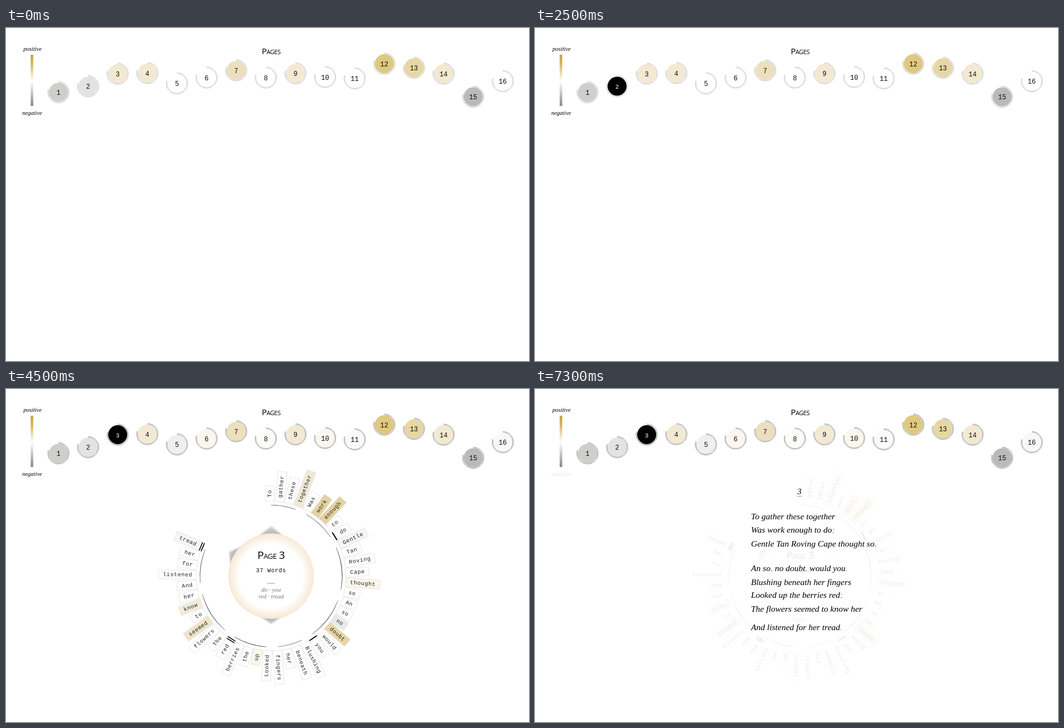
An HTML page that plays this animation: 937x598 px, repeating every 8.3 s.

```html
<!DOCTYPE html>
<html lang="en">
<head>
<meta charset="utf-8">
<style>
html, body { margin: 0; width: 100%; height: 100%; overflow: hidden; background: #fff; }
svg { display: block; }
text { text-anchor: middle; }
.mono { font-family: "Liberation Mono", monospace; }
.word { font-size: 10px; letter-spacing: .6px; fill: #222; }
.title { font-family: "Open Sans", "Noto Sans", sans-serif; font-stretch: 75%; font-variant: small-caps; letter-spacing: -.5px; }
.script { font-family: "Liberation Serif", serif; font-style: italic; }
.verse { font-size: 15.5px; text-anchor: start; }
.star { filter: blur(1.5px); }
</style>
</head>
<body>
<svg id="stage" width="937" height="598" viewBox="0 0 937 598"></svg>
<script>
const LOOP = 8300, STEP = 7.35, INNER = 134, RING = 127.5;

const heights = [115.5, 104.5, 82, 81, 99.5, 89, 76, 89, 81.5, 88, 90.5, 64, 71.5, 82, 123.5, 95.5];
const moods = '#cececd #e3e3e3 #f3e9d3 #f3e9d3 #efefef #faf7ef #ecdfbd #fbfbf8 #f3e9d3 #faf7ee #fafaf8 #dfc97f #e6d7a3 #f3e9d1 #bababa #f8f8f8'.split(' ');
const pale = [5, 6, 8, 10, 11, 16];   // pages whose tint appears late

// Words carry an optional tint; slashes separate verse lines.
const pages = [
  { x: 476, y: 332, title: '1', count: 41, rim: '#dadada', back: 155, keys: ['old · wood', 'supplied · died'],
    spikes: [70, 104, 90, 88, 89, 89],
    text: 'There was a lonely#9e9e9e cabin/Within a dark#ababab old#f3ecda wood/And in it with her mother/There dwelt Tan Roving Cape/The tall#f4f4f4 old trees above/them Their winter fire#e2e2e2 supplied#fbf6e9/When Autumns flaming sunsets From/their red leaves had#f2f2f2 died#a6a6a6' },
  { x: 476, y: 334, title: 'Page 2', count: 41, rim: '#e6e6e6', back: 145, keys: ['sun · one', 'deep · still'],
    spikes: [86, 70, 88, 84, 70, 86],
    text: 'Whenever morn was waking/She went to find the sun#f3ecda/With blossoms#faf6ea in her basket/And songs for every one/The meadow paths were golden#efe3c8/The hedges green and deep#e2e2e2/And all the birds did sing/To buds that lay still#f2f2f2' },
  { x: 475, y: 336, title: 'Page 3', count: 37, rim: '#f5ead3', back: 138, keys: ['do · you', 'red · tread'],
    spikes: [90, 70, 70, 86, 70, 87],
    text: 'To gather these together#f1e9d6/Was work#e4d3a0 enough#e4d3a0 to do/Gentle#f5f5f5 Tan Roving Cape thought#faf6ea so/An so no#e9e9e9 doubt#e8d7a6 would you/Blushing beneath her fingers/Looked up#faf6ea the berries red/The flowers seemed#efe3c8 to know#f4ecdb her/And listened for her tread#f6f6f6' }
];

const verse = ['To gather these together', 'Was work enough to do;', 'Gentle Tan Roving Cape thought so,',
  'An so, no doubt, would you.', 'Blushing beneath her fingers', 'Looked up the berries red;',
  'The flowers seemed to know her', 'And listened for her tread.'];
const baselines = [91, 115, 140, 184, 209, 232, 257, 290];

// Point at a clockwise angle from twelve o'clock
const polar = (r, deg) => {
  const a = deg * Math.PI / 180;
  return `${(r * Math.sin(a)).toFixed(2)} ${(-r * Math.cos(a)).toFixed(2)}`;
};
const arc = (r, from, to) =>
  `M${polar(r, from)}A${r} ${r} 0 ${to - from > 180 ? 1 : 0} 1 ${polar(r, to)}`;
const label = (cls, x, y, str, attrs = '') => `<text class="${cls}" x="${x}" y="${y}" ${attrs}>${str}</text>`;

function dot(y, i) {
  const n = i + 1;
  const ring = arc(19.2, 0, 287) + arc(17.8, 0, 285);
  return `<g transform="translate(${94 + i * 53.07} ${y})">
    <circle r="17" fill="${moods[i]}" ${pale.includes(n) ? 'class="late"' : ''}/>
    <path class="ring" d="${ring}" fill="none" stroke-width=".45"/>
    <circle class="active" r="17"/>
    ${label('mono num', 0, 4.5, n)}</g>`;
}

function wordBox(word, index, bars) {
  const [str, tint = '#fff'] = word.split(/(?=#)/);
  const angle = -1 + STEP * index;
  const len = str.length * 6.6 + 15, r = INNER + (bars ? 4 : 0), mid = r + len / 2;
  let marks = '';
  for (let b = 0; b < bars; b++) {
    const x = bars > 1 ? 133 + b * 3.6 : 134.5;
    marks += `<path d="M${x} -8V8" stroke="#000" stroke-width="${bars > 1 ? 1.6 : 2}"/>`;
  }
  return `<g transform="rotate(${angle - 90})">
    <rect x="${r}" y="-8.2" width="${len}" height="16.4" fill="${tint}" stroke="#ddd" stroke-width=".7"/>${marks}
    <g transform="translate(${mid}) rotate(${angle > 180 ? 180 : 0})">${label('mono word', .3, 3, str)}</g></g>`;
}

function wheel(page, p) {
  let index = 0, words = '', arcs = '';
  page.text.split('/').forEach((line, l) => {
    const list = line.split(' '), first = index;
    list.forEach((word, w) => {
      const bars = w === list.length - 1 && l % 2 ? (l > 4 ? 2 : 1) : 0;
      words += wordBox(word, index++, bars);
    });
    const from = STEP * first, to = STEP * (index - 1) - 2;
    arcs += `${arc(RING, from, to)}A${page.back} ${page.back} 0 0 0 ${polar(RING, from)}Z`;
  });
  const star = page.spikes.map((r, i) => `${polar(r, i * 60)} ${polar(70, i * 60 + 30)}`).join(' ');
  return `<g class="wheel" transform="translate(${page.x} ${page.y})">
    <radialGradient id="rim${p}"><stop offset=".75" stop-color="#fff"/><stop offset="1" stop-color="${page.rim}"/></radialGradient>
    <polygon class="star" points="${star}" fill="url(#spike)"/>
    <circle r="76.5" fill="url(#rim${p})" stroke="${page.rim}" stroke-width=".4"/>
    <path d="${arcs}" stroke="#000" stroke-width=".25"/>${words}
    ${label('title', 0, -31, page.title, `font-size="${page.title.length > 1 ? 19 : 26}" font-weight="${page.title.length > 1 ? 400 : 300}"`)}
    ${label('mono', 0, -7, page.count + ' Words', 'font-size="10" letter-spacing=".75"')}
    <path d="M-7 13H7" stroke="#999"/>
    ${page.keys.map((k, i) => label('script', 0, 27.5 + i * 12.5, k, 'font-size="11" fill="#777"')).join('')}</g>`;
}

const stage = document.getElementById('stage');
stage.innerHTML = `<defs>
  <linearGradient id="scale" x2="0" y2="1"><stop stop-color="#c6a23a"/><stop offset=".18" stop-color="#d4b65e"/>
    <stop offset=".52" stop-color="#fff"/><stop offset="1" stop-color="#858585"/></linearGradient>
  <radialGradient id="spike" gradientUnits="userSpaceOnUse" cx="0" cy="0" r="102">
    <stop offset=".74" stop-color="#b4b4b4"/><stop offset="1" stop-color="#f4f4f4"/></radialGradient></defs>
  ${label('title', 475, 46.5, 'Pages', 'font-size="15"')}
  ${label('script', 47.5, 41, 'positive', 'font-size="10.5"')}
  ${label('script', 47, 156, 'negative', 'font-size="10.5"')}
  <rect x="44.2" y="48" width="4.6" height="92" fill="url(#scale)"/>
  ${heights.map(dot).join('')}
  ${pages.map(wheel).join('')}
  <g id="panel"><rect width="937" height="598" fill="#fff" opacity=".9"/>
    <rect x="463" y="26" width="20" height="32" fill="#fff"/>
    ${label('script', 473.5, 46, 3, 'font-size="15.5"')}<path d="M469 49.5H478" stroke="#999"/>
    ${verse.map((v, i) => label('script verse', 387, baselines[i], v.replace(/[,.;]/g, '<tspan fill="#999">$&</tspan>'))).join('')}</g>`;

const all = sel => [...stage.querySelectorAll(sel)];
const show = (el, on) => el.setAttribute('display', on ? 'inline' : 'none');
const actives = all('.active'), nums = all('.num'), rings = all('.ring'), late = all('.late'), wheels = all('.wheel');
const panel = document.getElementById('panel');
const stops = [476, 402, 308, 210, 143];

function draw(t) {
  const active = t < 1000 ? -1 : t < 2500 ? 0 : t < 4000 ? 1 : 2;
  const open = t >= 4500 ? 2 : t >= 3000 && t < 4000 ? 1 : t >= 1500 && t < 2500 ? 0 : -1;
  const settled = t >= 4500;
  actives.forEach((el, i) => show(el, i === active));
  nums.forEach((el, i) => {
    el.setAttribute('fill', i === active ? '#fff' : '#111');
    el.setAttribute('font-size', i === active ? 10.5 : 12);
  });
  rings.forEach(el => el.setAttribute('stroke', settled ? '#444' : '#999'));
  late.forEach(el => show(el, settled));
  wheels.forEach((el, i) => show(el, i === open));
  show(panel, t >= 6500);
  if (t >= 6500) {
    const step = Math.min(4, Math.floor((t - 6500) / 200));
    panel.setAttribute('transform', `translate(0 ${stops[step]})`);
  }
}

const start = performance.now();
function tick() {
  draw((performance.now() - start) % LOOP);
  requestAnimationFrame(tick);
}
tick();
</script>
</body>
</html>
```
